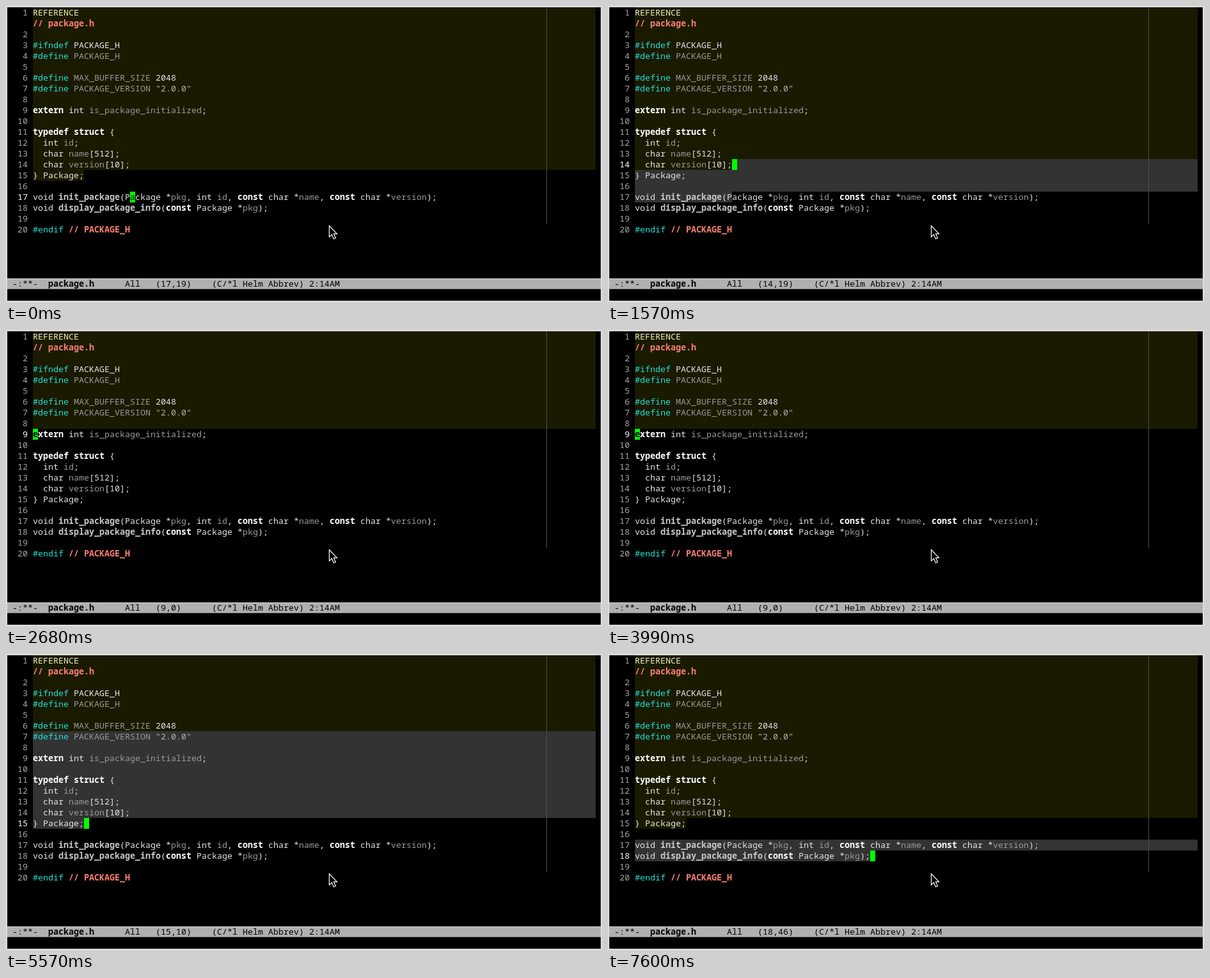
These frames come from a looping animation (932x464 px, 8000 ms). An HTML page with a canvas:

```html
<!DOCTYPE html>
<html lang="en">
<head>
<meta charset="utf-8">
<title>Editor</title>
<style>
  html, body { margin: 0; height: 100%; overflow: hidden; background: #000; }
  canvas { display: block; }
</style>
</head>
<body>
<canvas id="stage" width="932" height="464"></canvas>
<script>
const ctx = document.getElementById('stage').getContext('2d', { alpha: false });
const CELL = 8, ROW = 17, LEFT = 42, RIGHT = 922, TOP = 2, LOOP = 8000;
const FONT = '13.333px "Noto Sans Mono", "DejaVu Sans Mono", monospace';

const lines = `REFERENCE
// package.h

#ifndef PACKAGE_H
#define PACKAGE_H

#define MAX_BUFFER_SIZE 2048
#define PACKAGE_VERSION "2.0.0"

extern int is_package_initialized;

typedef struct {
  int id;
  char name[512];
  char version[10];
} Package;

void init_package(Package *pkg, int id, const char *name, const char *version);
void display_package_info(const Package *pkg);

#endif // PACKAGE_H`.split('\n');

const styles = {
  comment: ['#fa8072', true],
  directive: ['#20e0d4'],
  keyword: ['#fff', true],
  call: ['#c8c8c8', true],
  variable: ['#999'],
  string: ['#b0b5aa'],
  title: ['#eeeebb'],
  plain: ['#e5e5e5']
};
const syntax = new RegExp([
  '(?<comment>//.*)',
  '(?<directive>#\\w+)',
  '(?<keyword>\\b(?:extern|typedef|struct|const)\\b)',
  '(?<call>\\w+(?=\\())',
  '(?<variable>(?<=define )\\w+|\\b(?:is_package_initialized|id|name|version|pkg)\\b)',
  '(?<string>".*")',
  '(?<title>REFERENCE)',
  '(?<plain>\\w+|[^\\w\\s])'
].join('|'), 'g');
const tokens = lines.map(line => [...line.matchAll(syntax)].map(m => {
  const kind = Object.keys(m.groups).find(k => m.groups[k] !== undefined);
  return { text: m[0], col: m.index, color: styles[kind][0], bold: styles[kind][1] };
}));

// [time, row, col, changes that persist]
const steps = [
  [0, 17, 19, { ref: [15, 10], mark: null, cursor: true, echo: '' }],
  [370, 17, 19, { cursor: false }],
  [860, 17, 19, { cursor: true }],
  [980, 17, 19, { mark: [17, 19], echo: 'Mark set' }],
  [1200, 16, 0, { echo: '' }],
  [1570, 14, 19],
  [1690, 9, 19],
  [1810, 9, 0],
  [2680, 9, 0, { ref: [9, 0], mark: null }],
  [3160, 10, 0], [3280, 11, 0], [3400, 12, 0], [3520, 13, 0],
  [3750, 12, 0], [3870, 10, 0], [3990, 9, 0], [4110, 8, 0], [4230, 7, 0],
  [4350, 7, 0, { mark: [7, 0], echo: 'Mark set' }],
  [4590, 8, 0, { echo: '' }],
  [4960, 11, 0],
  [5080, 16, 0],
  [5450, 15, 0],
  [5570, 15, 10],
  [6440, 15, 10, { ref: [15, 10], mark: null }],
  [6670, 16, 0],
  [6920, 17, 0],
  [7260, 17, 0, { mark: [17, 0], echo: 'Mark set' }],
  [7490, 18, 0, { echo: '' }],
  [7600, 18, 46]
];

const rowY = row => TOP + row * ROW;
const colX = col => LEFT + col * CELL;

function rect(color, x, y, w, h) {
  ctx.fillStyle = color;
  ctx.fillRect(x, y, w, h);
}

function write(text, x, y, color, bold) {
  ctx.font = (bold ? 'bold ' : '') + FONT;
  ctx.fillStyle = color;
  ctx.fillText(text, x, y + 13);
}

function drawRow(row, color) {
  for (const t of tokens[row]) write(t.text, colX(t.col), rowY(row), color || t.color, t.bold);
}

function highlight(color, a, b) {
  const [from, to] = a[0] - b[0] || a[1] - b[1] ? [a, b].sort((p, q) => p[0] - q[0] || p[1] - q[1]) : [a, a];
  for (let row = from[0]; row <= to[0]; row++) {
    const x = row === from[0] ? colX(from[1]) : LEFT;
    const end = row === to[0] ? colX(to[1]) : RIGHT;
    rect(color, x, rowY(row), end - x, ROW);
  }
}

function drawCursor(row, col) {
  ctx.save();
  ctx.beginPath();
  ctx.rect(colX(col), rowY(row), CELL, ROW);
  ctx.clip();
  rect('#0f0', colX(col), rowY(row), CELL, ROW);
  drawRow(row, '#000');
  ctx.restore();
}

function drawModeLine(row, col) {
  const y = 427;
  rect('#b0b0b0', 2, y, 928, ROW);
  rect('#d0d0d0', 2, y, 928, 1);
  rect('#808080', 2, y + ROW - 1, 928, 1);
  const at = (c, text, bold) => write(text, 10 + c * CELL, y, '#000', bold);
  at(0, '-:**-');
  at(7, 'package.h', true);
  at(22, 'All');
  at(28, `(${row},${col})`);
  at(39, '(C/*l Helm Abbrev) 2:14AM');
}

const pointer = new Path2D('M505.5 344.5V362L509.5 358.3L512.5 365L515.5 363.7L512.5 357.2H517.5Z');

function draw(time) {
  const state = {};
  for (const [start, row, col, change] of steps) {
    if (start > time) break;
    Object.assign(state, { row, col }, change);
  }
  const { row, col } = state;
  rect('#dcdcdc', 0, 0, 932, 464);
  rect('#000', 2, 2, 928, 460);
  highlight('#1a1a00', [0, 0], state.ref);
  if (state.mark) highlight('#333', state.mark, [row, col]);
  rect('#4d4d4d', 845, TOP, 1, 20 * ROW);

  lines.forEach((_, i) => {
    const label = i === 1 ? '' : String(i || 1);
    write(label, 34 - label.length * CELL, rowY(i), i === row ? '#fff' : '#a6a6a6');
    drawRow(i);
  });
  if (state.cursor) drawCursor(row, col);
  drawModeLine(row, col);
  write(state.echo, 10, 444, '#e5e5e5');

  ctx.fillStyle = '#000';
  ctx.fill(pointer);
  ctx.strokeStyle = '#fff';
  ctx.lineWidth = 1.2;
  ctx.stroke(pointer);
}

const begin = performance.now();
function tick() {
  draw((performance.now() - begin) % LOOP);
  requestAnimationFrame(tick);
}
tick();
</script>
</body>
</html>
```
